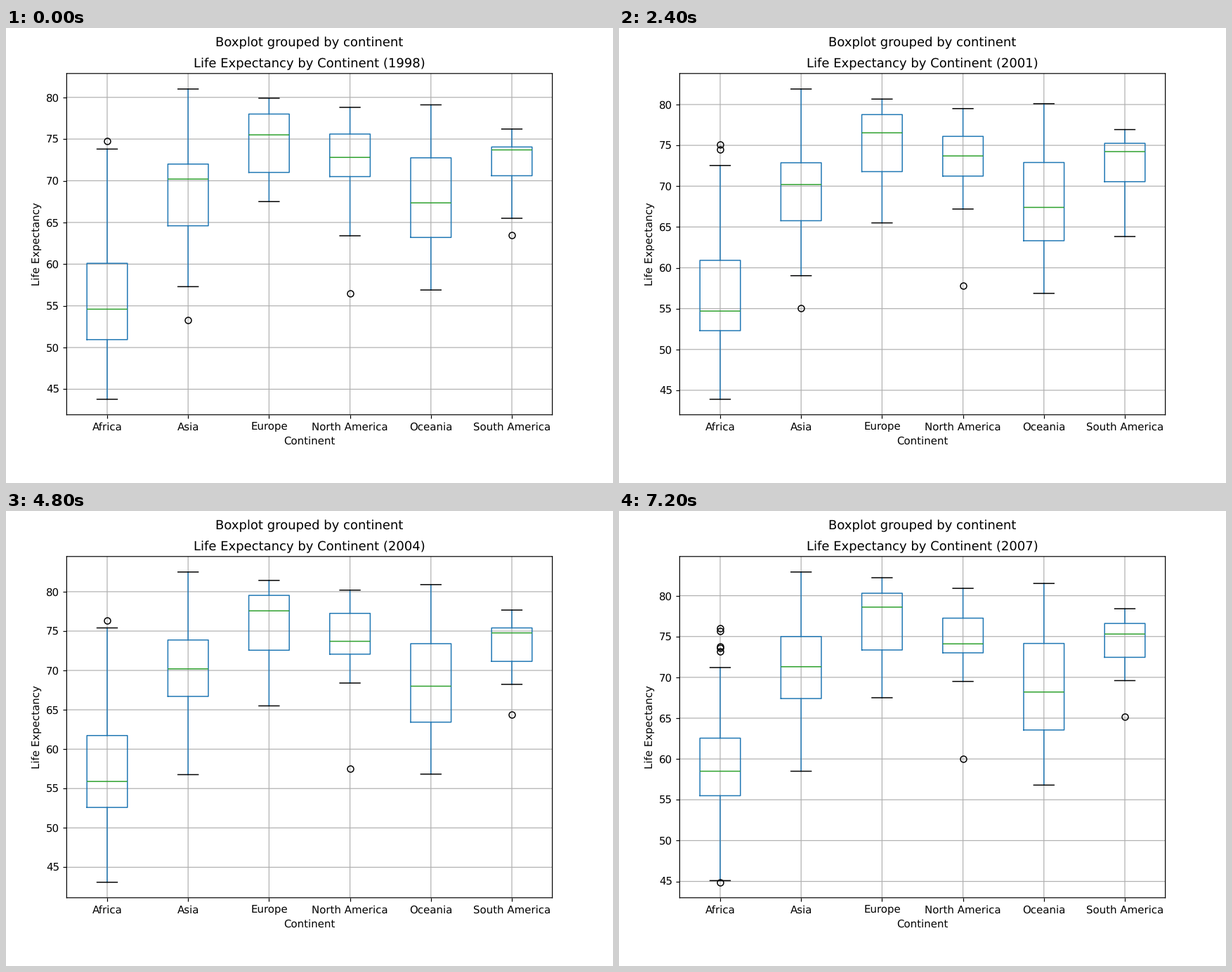
Recreate the animation shown at these times as a matplotlib script. Size 864 by 648 pixels, loop 8000 ms.

```python
import numpy as np
import matplotlib.pyplot as plt
from matplotlib.animation import FuncAnimation
from matplotlib.ticker import MultipleLocator

FIRST_YEAR, LAST_YEAR = 1998, 2007
YEAR_COUNT = LAST_YEAR - FIRST_YEAR + 1
BLUE, GREEN = "#1f77b4", "#2ca02c"

# Every track is a few key values spread evenly from the first to the last year.
# Quartiles are (q1, median, q3); extremes are the countries far from the middle.
QUARTILES = {
    "Africa": [(50.95, 52.3, 52.6, 55.5), (54.6, 54.7, 55.9, 58.5), (60.1, 62.55)],
    "Asia": [(64.6, 66.35, 67.4), [70.2] * 9 + [71.3], (72, 73.3, 75)],
    "Europe": [(71, 73.35), (75.5, 78.6), (78, 80.3)],
    "North America": [(70.5, 71.6, 73), (72.8, 73.7, 73.7, 74.1),
                      (75.6, 76.1, 77.25, 77.25)],
    "Oceania": [(63.2, 63.55), (67.35, 67.4, 68, 68.2), (72.75, 72.9, 73.4, 74.15)],
    "South America": [(70.6, 70.55, 71.15, 72.45), (73.7, 75.3),
                      (74.05, 75.25, 75.4, 76.6)],
}
EXTREMES = {
    "Africa": [(43.8, 43.8, 43.9, 44.2, 43.1, 43.7, 44.9), (44.5, 45.1),
               (69, 71.2), (70.5, 73.2), (71, 73.6), (71.9, 73.8),
               (74.8, 75.7), (73.8, 74.5, 76.35, 76)],
    "Asia": [(53.3, 58.5), (57.3, 62.5), (81, 81.9, 82.5, 82.9)],
    "Europe": [(67.5, 65.5, 65.5, 67.5), (79.9, 82.2)],
    "North America": [(56.5, 57.8, 57.5, 60), (63.4, 67.2, 68.4, 69.5), (78.8, 80.9)],
    "Oceania": [(56.9, 56.8), (79.1, 80.1, 80.9, 81.5)],
    "South America": [(63.5, 64, 65.15), (65.5, 69.6), (76.2, 78.4)],
}

# Lines lie at their true positions rather than on whole pixels.
plt.rcParams.update({"path.snap": False, "text.hinting": "none"})


def value_at(track, t):
    return np.interp(t, np.linspace(0, 1, len(track)), track)


def box_stats(label, t):
    """Whiskers reach the last value within 1.5 box heights; the rest are fliers."""
    q1, med, q3 = (value_at(track, t) for track in QUARTILES[label])
    values = [value_at(track, t) for track in EXTREMES[label]]
    reach = 1.5 * (q3 - q1)
    inside = [v for v in values if q1 - reach <= v <= q3 + reach]
    fliers = [v for v in values if v not in inside]
    return dict(label=label, q1=q1, med=med, q3=q3, fliers=fliers,
                whislo=min(inside), whishi=max(inside))


fig, ax = plt.subplots(figsize=(8, 6), dpi=108)
fig.subplots_adjust(left=0.1, right=0.9, bottom=0.15, top=0.9)
fig.suptitle("Boxplot grouped by continent")


def draw(i):
    stats = [box_stats(label, i / (YEAR_COUNT - 1)) for label in QUARTILES]
    ax.clear()
    ax.bxp(
        stats,
        widths=0.5,
        boxprops=dict(color=BLUE, linewidth=1),
        whiskerprops=dict(color=BLUE, linewidth=1),
        medianprops=dict(color=GREEN, linewidth=1),
        capprops=dict(color="black", linewidth=1),
        flierprops=dict(marker="o", markersize=6, markeredgecolor="black",
                        markerfacecolor="none"),
    )
    low = min(min([s["whislo"], *s["fliers"]]) for s in stats)
    high = max(max([s["whishi"], *s["fliers"]]) for s in stats)
    margin = 0.05 * (high - low)
    ax.set_xlim(0.5, len(stats) + 0.5)
    ax.set_ylim(low - margin, high + margin)
    ax.yaxis.set_major_locator(MultipleLocator(5))
    ax.grid(True)
    ax.set_title(f"Life Expectancy by Continent ({FIRST_YEAR + i})")
    ax.set_xlabel("Continent")
    ax.set_ylabel("Life Expectancy")
    return []


anim = FuncAnimation(fig, draw, frames=YEAR_COUNT, interval=800,
                     init_func=lambda: draw(0), repeat=True, repeat_delay=0)
plt.show()
```
